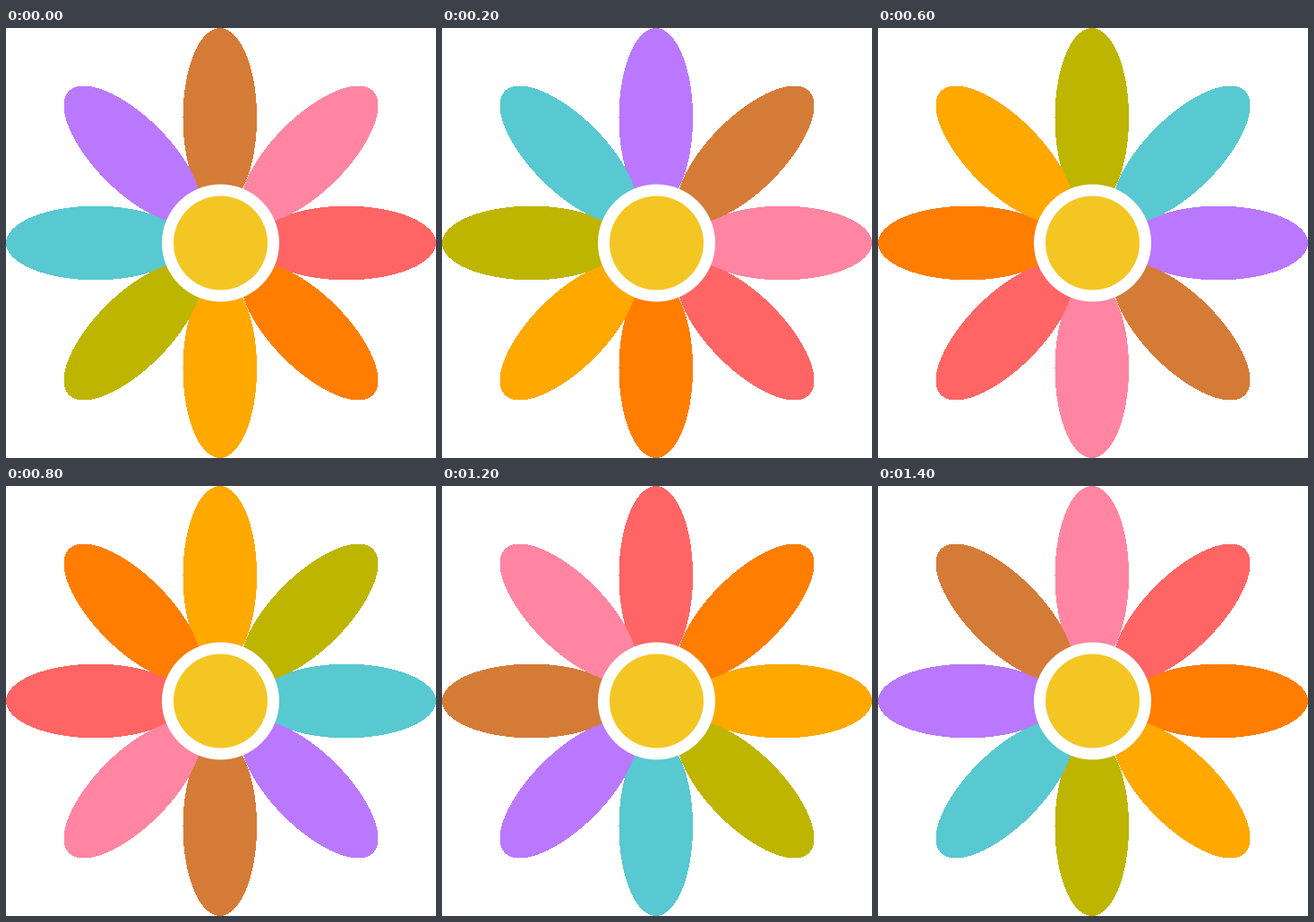
An HTML page that plays this animation: 480 by 480 pixels, repeating every 1600 ms.

```html
<!DOCTYPE html>
<html lang="en">
<head>
<meta charset="utf-8">
<title>Colour wheel flower</title>
<style>
  html, body { margin: 0; width: 100%; height: 100%; overflow: hidden; background: #fff; }
  svg { display: block; width: 100%; height: 100%; }
</style>
</head>
<body>
<svg viewBox="0 0 480 480">
  <g id="petals" shape-rendering="crispEdges"></g>
  <circle cx="239.5" cy="240" r="65.5" fill="#fff"/>
  <circle cx="239.5" cy="240" r="52.5" fill="#f4c623"/>
</svg>
<script>
  const STEP = 200;
  // Clockwise from the top petal
  const COLORS = ['#d57b38', '#ff85a2', '#ff6565', '#ff7d00',
                  '#ffa800', '#bdb500', '#58c8d1', '#ba78ff'];
  const COUNT = COLORS.length;
  const group = document.getElementById('petals');
  const petals = [];

  function addPetal(i) {
    const petal = document.createElementNS('http://www.w3.org/2000/svg', 'ellipse');
    const vertical = i % 4 === 0;
    const attrs = {
      cx: 0, cy: -140, rx: 41.3, ry: 100,
      transform: `translate(${vertical ? 238.8 : 240} 240) rotate(${i * 360 / COUNT})`
    };
    for (const key in attrs) petal.setAttribute(key, attrs[key]);
    group.appendChild(petal);
    petals[i] = petal;
  }

  // Diagonal petals lie above the straight ones
  [0, 2, 4, 6, 1, 3, 5, 7].forEach(addPetal);

  function draw(ms) {
    const shift = Math.floor(ms / STEP) % COUNT;
    petals.forEach((petal, i) => {
      petal.setAttribute('fill', COLORS[(i - shift + COUNT) % COUNT]);
    });
  }

  const start = performance.now();
  function tick() {
    draw(performance.now() - start);
    requestAnimationFrame(tick);
  }
  tick();
</script>
</body>
</html>
```
